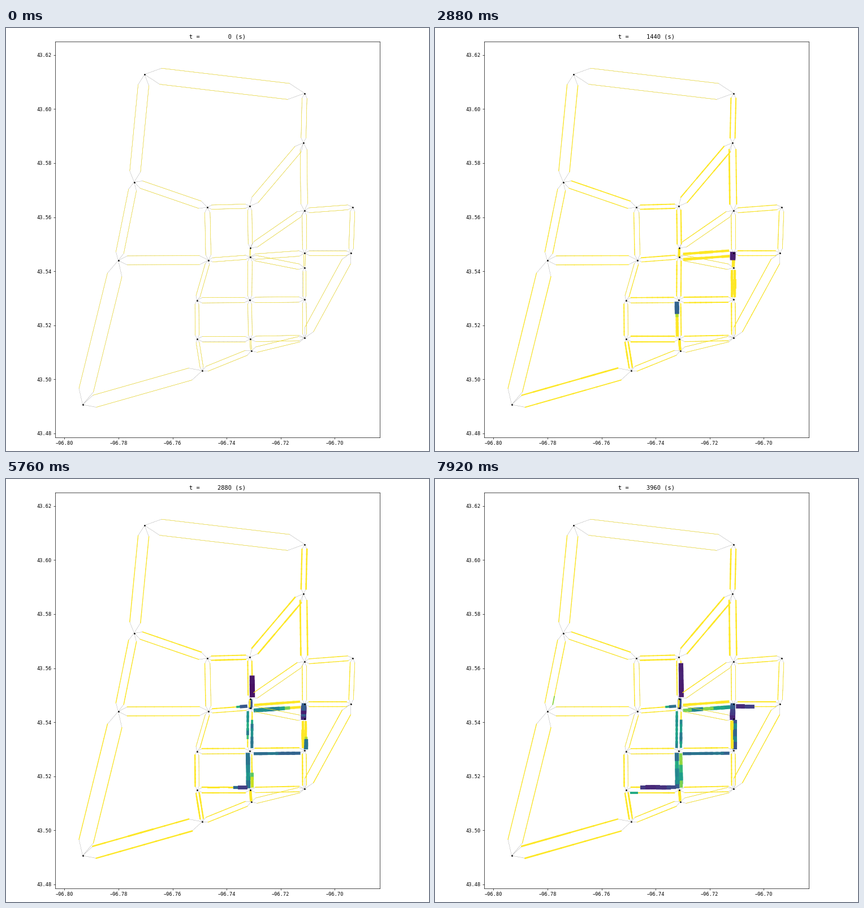
Recreate the animation shown at these times as a matplotlib script. Size 748 by 748 pixels, loop 8 s.

```python
import numpy as np
import matplotlib.pyplot as plt
from matplotlib.animation import FuncAnimation
from matplotlib.collections import LineCollection

SIZE, DPI = 748, 748 / 12
PT = DPI / 72                  # pixels per point
STEP_SECONDS, FRAMES_PER_STEP, LAST_STEP = 120, 3, 33
CELLS = 8
THIN = 0.7 * PT                # width of an empty cell, in pixels

NODES = dict(
    A=(245, 82), B=(528, 115.5), C=(526, 203), D=(226.5, 272.5),
    E=(356, 317), F=(431, 315), G=(527.5, 323), H=(613, 316.5),
    I=(432, 389), J=(431.5, 405), K=(528, 398), L=(610, 398),
    M=(527.5, 424), N=(358, 410.5), O=(198.5, 411), P=(337.5, 481.5),
    Q=(431, 481), R=(527.5, 480), S=(338, 550), T=(432, 550),
    U=(528, 548), V=(433.5, 571), W=(347, 606), X=(135.5, 666))

EDGES = ("AB AD BC CF CG DE DO OX ON EN EF FI GI GH HL GK KL IJ JK JM KM MR "
         "NJ NP JQ PQ QR PS QT RU ST TU TV UV SW VW WX LU").split()
LINKS = [name for edge in EDGES for name in (edge, edge[::-1])]

# traffic classes: (full width, step at which it sets in, links)
ORDINARY = (1.3, 5)
CLASSES = [
    (THIN, 0, "AB BA"),
    (0.8, 5, "JM MJ GI UV VU EN HL PN PS GK"),
    (1.8, 0, "DE EF KL PQ NJ TU"),
    (2.1, 0, "IF FI QR RQ UR TS QJ JQ QT VT"),
    (2.6, 0, "ST SW WS TV XW KM MK GC JI IJ"),
    (2.4, 7, "CF FC CG WX SP CB BC FE"),
    (4.8, 0, "JK KJ MR RM TQ"),
]
CLASS_OF = {name: (width, onset)
            for width, onset, names in CLASSES for name in names.split()}

# queues grow upstream: link -> (onset step, longest reach in cells, width)
QUEUES = dict(
    TQ=(9, 8, 7.2), MK=(9, 8, 8.6), RQ=(14, 8, 5.1), NJ=(14, 1.5, 5.4),
    IJ=(15, 8, 6), JQ=(17, 6, 4.6), QJ=(17, 8, 4.3), KJ=(17, 8, 6.4),
    FI=(19, 7, 8.6), QT=(20, 8, 5.9), MR=(21, 8, 7.4), ST=(22, 6, 7),
    LK=(28, 3, 7), TS=(32, 1, 4.8), DO=(32, 1, 2.3))
GROWTH = 0.8                   # cells per step
DENSE_ROADS = {"TQ", "MK", "KJ", "QT", "MR"}

rng = np.random.default_rng(7)
NOISE = np.repeat(rng.uniform(-1, 1, (len(LINKS), 24)), 2, axis=1)


def link_points(name):
    """Cell borders of a link, shifted to the left of its direction."""
    a, b = (np.array(NODES[n]) for n in name)
    dx, dy = b - a
    share = np.linspace(0.1, 0.9, CELLS + 1)[:, None]
    return a + share * (b - a) + 0.05 * np.array([dy, -dx])


def speed(width, slope):
    """Relative speed in a cell under a triangular flow-density relation."""
    density = np.clip((width / PT - 0.5) / 11.5, 1e-3, 1)
    return np.clip(slope * (1 / density - 1), 0, 1)


def link_state(k, name, step):
    full, onset = CLASS_OF.get(name, ORDINARY)
    grown = 1 - np.exp(-max(0, step - onset) / 4)
    start = LAST_STEP - step
    platoons = NOISE[k, start:start + CELLS]       # drift downstream
    width = THIN + (full - THIN) * grown * (1 + 0.2 * platoons)
    pace = np.ones(CELLS)
    if name in QUEUES:
        onset, longest, size = QUEUES[name]
        reach = np.clip(GROWTH * (step - onset), 0, longest)
        inside = np.clip(reach - np.arange(CELLS)[::-1], 0, 1)
        waves = NOISE[k, step:step + CELLS]        # drift upstream
        width += inside * (size * (1 + 0.12 * waves) - width)
        slope = 0.9 if name in DENSE_ROADS else 0.33
        if name == "DO":
            slope = 0.14
        pace = np.where(inside > 0, speed(width, slope), 1)
    return width, pace


plt.rcParams["font.family"] = "DejaVu Sans Mono"
fig = plt.figure(figsize=(SIZE / DPI, SIZE / DPI), dpi=DPI)
left, right, top, bottom = 87.2, 660.8, 23.6, 723.9
ax = fig.add_axes([left / SIZE, 1 - bottom / SIZE,
                   (right - left) / SIZE, (bottom - top) / SIZE])
ax.set_xlim(left, right)
ax.set_ylim(bottom, top)
ax.set_xticks([103.4 + 95.55 * i for i in range(6)],
              [f"\u2212{96.8 - 0.02 * i:.2f}" for i in range(6)])
ax.set_yticks([716.8 - 95.57 * i for i in range(8)],
              [f"{43.48 + 0.02 * i:.2f}" for i in range(8)])
title = ax.set_title("")

paths = [link_points(name) for name in LINKS]
outlines = [np.vstack([NODES[n[0]], p, NODES[n[1]]]) for n, p in zip(LINKS, paths)]
ax.add_collection(LineCollection(outlines, colors="k", linewidths=0.25,
                                 linestyles="--", zorder=5), autolim=False)
pieces = [p[i:i + 2] for p in paths for i in range(CELLS)]
cells = LineCollection(pieces, capstyle="projecting", zorder=6)
ax.add_collection(cells, autolim=False)
ax.plot(*zip(*NODES.values()), "ko", ms=2, zorder=10)


def draw(frame):
    step = frame // FRAMES_PER_STEP
    states = [link_state(k, name, step) for k, name in enumerate(LINKS)]
    widths, paces = (np.concatenate(part) for part in zip(*states))
    cells.set_linewidths(widths / PT)
    cells.set_color(plt.colormaps["viridis"](paces))
    title.set_text(f"t = {step * STEP_SECONDS:>8} (s)")
    return cells, title


anim = FuncAnimation(fig, draw, frames=100, interval=80, repeat=True,
                     repeat_delay=0, blit=False)
plt.show()
```
